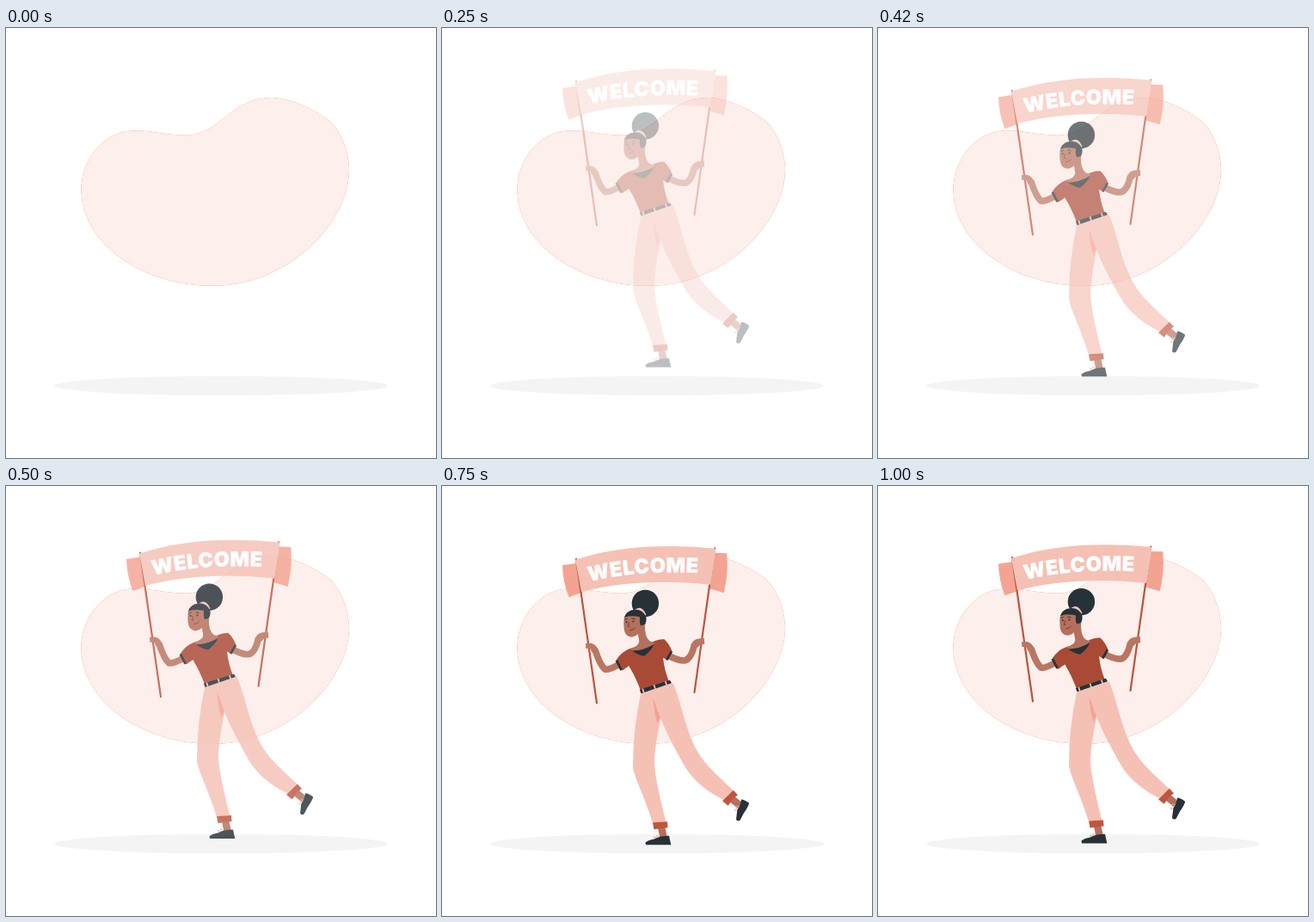
Animation of 500x500 px, one loop 1040 ms. Source, as an HTML page:

```html
<!DOCTYPE html>
<html lang="en">
<head>
<meta charset="utf-8">
<title>Welcome</title>
<style>
  html, body { margin: 0; width: 100%; height: 100%; overflow: hidden; background: #fff; }
  svg { display: block; width: 100%; height: 100%; }
  .dark { fill: #263238; }
  .skin { fill: #b4705c; }
  .arm { fill: none; stroke: #b97662; stroke-width: 7.6; stroke-linejoin: round; }
  .hand { fill: #b97662; }
  .rust { fill: #c0553d; }
  .shirt { fill: #a94a36; }
  .pink { fill: #f5c1b5; }
  .coral { fill: #f4a392; }
  .pole { stroke: #bf533c; stroke-width: 2.2; stroke-linecap: round; }
  .cuff { stroke: #263238; stroke-width: 2.8; }
  .line { fill: none; stroke: #263238; stroke-width: .9; stroke-linecap: round; }
  .lace { fill: none; stroke: #f0a999; stroke-width: .9; }
  text { font: 900 23.6px Inter, "Liberation Sans", sans-serif; letter-spacing: .35px; fill: #fff; stroke: #fff; stroke-width: .3; }
</style>
</head>
<body>
<svg viewBox="0 0 500 500">
  <defs>
    <path id="blob" d="M150 119.3C170 119.3 190 125.5 212 124.7C250 122 262 81 309 81C330 81 360 95 376 108C388 118 399 142 399 165C399 225 330 300 240 299.8C160 300 88 252 87.5 188C87.5 155 112 119.3 150 119.3Z"/>
    <path id="baseline" d="M171 109.3C215 99 255 97 312 99.8"/>
  </defs>

  <use href="#blob" fill="#eb5f41"/>
  <use href="#blob" fill="#fff" opacity=".9"/>
  <ellipse cx="250" cy="416" rx="194" ry="11.3" fill="#f4f4f4"/>

  <g id="figure">
    <!-- banner -->
    <path class="coral" d="M140 90.5L157 88L164 121.5L147.5 127.3Q140.5 110 140 90.5Z"/>
    <path class="coral" d="M317 76L331.3 76.3Q333.5 98 327.8 122.3L311 117.5Z"/>
    <path class="pole" d="M156 83L180 250.5M317.2 70.5L293.5 238"/>
    <path class="pink" d="M155 84C205 67 265 65.5 318.7 71L312.3 113C262 107.5 210 109 162 121.5Z"/>
    <text><textPath href="#baseline">WELCOME</textPath></text>

    <!-- arms -->
    <path class="arm" d="M208 204.5Q194 212.5 189.5 211.2Q183.5 206 178 188.5"/>
    <path class="hand" d="M167 181.2L173.5 181Q180 183 182 190L174.5 192L172.5 187.5L167.3 187Z"/>
    <path class="arm" d="M261 194Q275 202 283 201Q290.5 198 293.6 182"/>
    <path class="hand" d="M289.8 185Q290.3 177.5 297 176L304.8 175L305.3 182L299.5 183.5L297.3 186Z"/>

    <!-- back shoe and front shoe -->
    <path class="skin" d="M339 358L348.5 366L344 373L334.5 365.5Z"/>
    <path class="lace" d="M345 370l-4 1l2 2l-3 2l3 1"/>
    <path class="dark" d="M348 362.6Q352 362.8 357.2 367Q356 371.5 351 378.5L346.5 387Q343.5 388.5 342 386L343.4 374.5Q347 370 348 362.6Z"/>
    <path class="skin" d="M251 395.5L259.5 395.5L262 407L253.5 408Z"/>
    <path class="lace" d="M254 407l-4-3l-1 3l-3-1l2 3"/>
    <path class="dark" d="M237 415.4L236.5 412.6Q240 409.8 247 408.6Q252 405 264 404.8L266.3 415.4Z"/>

    <!-- trousers -->
    <path class="pink" d="M231.5 238Q222 280 222 325C224 338 235 358 245 390L260.5 389Q249 345 247 322C247 300 254 272 256 258L252 235Z"/>
    <path class="coral" d="M245.5 245L256 264Q252 270 250.5 275Q246.5 262 245.5 245Z"/>
    <path class="pink" d="M242 236L268.5 227.5C276 243 281 272 292 297C302 320 317 331 339.5 353L328 363.5C311 355 292 342 281 322C269 300 254 274 245.5 243Z"/>
    <path class="rust" d="M338.8 351.8L344 357.3L338 362L332.8 369.8L326 364.5Z"/>
    <path class="rust" d="M245 389.5L262 388.5L262.5 395.5L246.5 397.5Z"/>

    <!-- top -->
    <path class="shirt" d="M218 187.5Q209 191 203 200L209.5 213L217.3 207.5Q225 220 231 236L264 226Q258.5 212 257 198L261.7 200.5L267.3 189.5Q263.5 181 258.5 176.5Q251 176 244 180Z"/>
    <path class="cuff" d="M202.8 200.8L208.6 212.2M267 190.3L261.3 200.5"/>
    <path class="skin" d="M227 165L236 160Q235.5 174 241.5 178.5L247 180.5L246 184Q240 189 234 191.5Q226 192 218.5 187.5Q229 184.5 229.3 179Z"/>
    <path class="dark" d="M221.3 189.8Q235 189.3 246.8 181.8Q243.5 189.5 235 195.8Q227.5 194.5 221.3 189.8Z"/>
    <path class="dark" d="M229.8 235L265 223.8L267 227.3L231.5 239.3Z"/>
    <path d="M233.3 233.8l1.4 4.6M246.5 229.4l1.4 4.6M259.8 225.3l1.4 4.4" stroke="#f5c0b4" stroke-width="1.7"/>

    <!-- head -->
    <circle class="dark" cx="236.4" cy="134.6" r="15.7"/>
    <path class="pink" d="M222.5 143.5Q232 134.5 237.5 148L233.5 151Q231 143 224 146Z"/>
    <path class="skin" d="M212 150Q210.5 160 212.3 167.5Q214.5 173.6 220.5 173.8Q228 173.5 231.5 164Q236.5 164 236.5 158L234 148Z"/>
    <path class="dark" d="M212 151Q214 142.8 224.5 142Q233 141.5 237.3 150Q238.5 157 235 159.5L231 160.3Q229.5 157 230 150.5Q221 148.3 212 151Z"/>
    <circle class="dark" cx="214.6" cy="156.3" r="1"/>
    <circle class="dark" cx="222.4" cy="155.6" r="1"/>
    <path class="line" d="M212.8 153.4l2.4-.8M220.8 152.4q2-.8 3.4.5"/>
    <path class="line" d="M217.6 157l-1.4 4.4h1.8M218.5 166q4 0 5.8-2.8" style="stroke:#81372a"/>
  </g>
</svg>
<script>
  const LOOP = 1040, FPS = 24, DROP = 30;
  const figure = document.getElementById("figure");

  const bezier = (a, b, s) => 3 * a * s * (1 - s) ** 2 + 3 * b * s * s * (1 - s) + s ** 3;

  // cubic-bezier(.36, -.01, .5, 1.38), solved by bisection
  function ease(x) {
    let low = 0, high = 1;
    for (let i = 0; i < 24; i++) {
      const mid = (low + high) / 2;
      if (bezier(.36, .5, mid) < x) low = mid; else high = mid;
    }
    return bezier(-.01, 1.38, low);
  }

  function draw(ms) {
    // the motion advances in steps of 1/24 s, rounded to 10 ms
    const step = Math.floor((ms % LOOP + 5) * FPS / 1000);
    const progress = step < 2 ? 0 : ease(Math.min(1, (step + 1) / FPS));
    figure.setAttribute("opacity", Math.max(0, Math.min(1, progress)));
    figure.setAttribute("transform", `translate(0 ${DROP * (progress - 1)})`);
  }

  const start = performance.now();
  function tick() {
    draw(performance.now() - start);
    requestAnimationFrame(tick);
  }
  tick();
</script>
</body>
</html>
```
